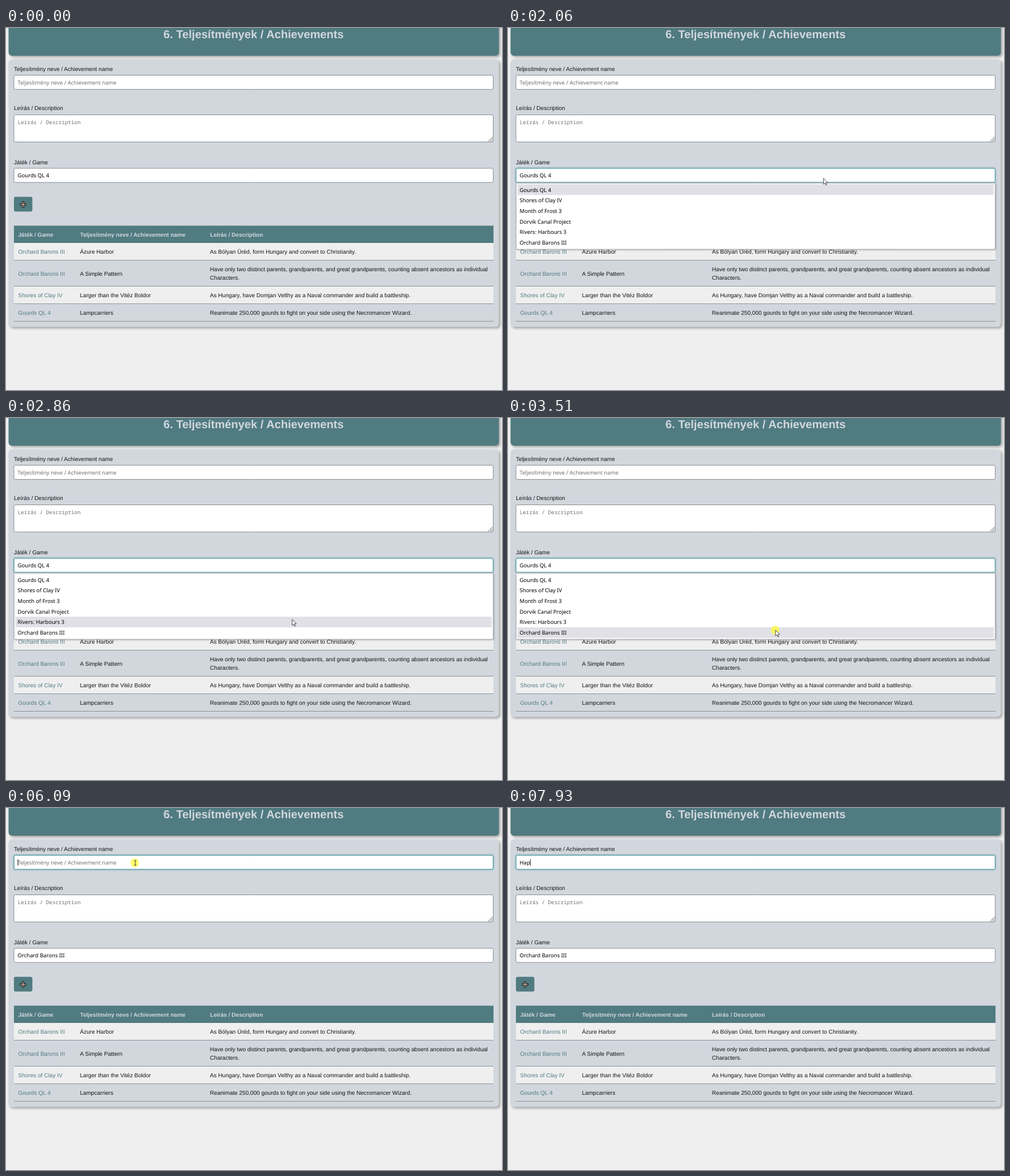
An HTML page with a canvas that plays this animation: 875x640 px, repeating every 8000 ms.

```html
<!DOCTYPE html>
<html lang="hu">
<head>
<meta charset="utf-8">
<title>Achievements</title>
<style>
  html, body { margin: 0; width: 100%; height: 100%; overflow: hidden; background: #efefef; }
  canvas { display: block; width: 875px; height: 640px; }
</style>
</head>
<body>
<canvas id="stage"></canvas>
<script>
const W = 875, H = 640, LOOP = 8000;
const TEAL = '#507b80', PANEL = '#d2d7de', LIGHT = '#efefef', INK = '#141619', PALE = '#d2d7de';
const SANS = '10.07px "Liberation Sans", Arial, sans-serif';
const BOLD = 'bold ' + SANS;
const TITLE = 'bold 20.15px "Liberation Sans", Arial, sans-serif';
const FIELD = '9.55px "Noto Sans", sans-serif';
const MONO = '9.22px "Noto Sans Mono", monospace';
const HINT = '#6f6f6f';

const NAME = 'Teljesítmény neve / Achievement name';
const GAMES = ['Gourds QL 4', 'Shores of Clay IV', 'Month of Frost 3',
  'Dorvik Canal Project', 'Rivers: Harbours 3', 'Orchard Barons III'];
const ROWS = [
  { y: 380, h: 31, game: 5, name: 'Ázure Harbor',
    text: ['As Bólyan Üréd, form Hungary and convert to Christianity.'] },
  { y: 411, h: 46, game: 5, name: 'A Simple Pattern',
    text: ['Have only two distinct parents, grandparents, and great grandparents, counting absent ancestors as individual', 'Characters.'] },
  { y: 457, h: 31, game: 1, name: 'Larger than the Vitéz Boldor',
    text: ['As Hungary, have Domjan Velthy as a Naval commander and build a battleship.'] },
  { y: 488, h: 31, game: 0, name: 'Lampcarriers',
    text: ['Reanimate 250,000 gourds to fight on your side using the Necromancer Wizard.'] }
];
const LIST_TOP = 276.5, LIST_STEP = 18.72;

// Pointer path: time, x, y, easing power (above 0 slows down, below 0 speeds up)
const PATH = [
  [480, 880, 385, 1], [1280, 605, 285, 1.5], [1440, 582.5, 277, 1], [1610, 558, 263, 1.3],
  [2040, 558, 263, 1], [2470, 530, 319.5, 1], [2860, 505, 356, 1], [3270, 472, 375, 1.3],
  [4040, 472, 375, 1], [4380, 374, 259, 1], [4820, 267, 136, 1], [5310, 228, 97, 1.4],
  [6240, 228, 97, 1], [6700, -14, 97, -1.3]
];
const CLICKS = [[1610, 1770], [3430, 3630], [6090, 6250]];

const canvas = document.getElementById('stage');
const ratio = window.devicePixelRatio || 1;
canvas.width = W * ratio;
canvas.height = H * ratio;
const c = canvas.getContext('2d');

const during = (t, a, b) => t >= a && t < b;

function text(s, x, y, font = SANS, color = INK, align = 'left') {
  c.font = font;
  c.fillStyle = color;
  c.textAlign = align;
  c.fillText(s, x, y);
}

function rect(x, y, w, h, color) {
  c.fillStyle = color;
  c.fillRect(x, y, w, h);
}

function box(x, y, w, h, r, fill, stroke) {
  c.beginPath();
  c.roundRect(x, y, w, h, r);
  c.fillStyle = fill;
  c.fill();
  if (stroke) {
    c.strokeStyle = stroke;
    c.lineWidth = 1;
    c.stroke();
  }
}

function shadow(color, blur, offset, draw) {
  c.save();
  c.shadowColor = color;
  c.shadowBlur = blur * ratio;
  c.shadowOffsetX = c.shadowOffsetY = offset * ratio;
  draw();
  c.restore();
}

function line(points, color, width) {
  c.beginPath();
  points.forEach(([x, y], i) => i ? c.lineTo(x, y) : c.moveTo(x, y));
  c.strokeStyle = color;
  c.lineWidth = width;
  c.stroke();
}

function field(y, h, focused) {
  const draw = () => box(14, y, 845.5, h, 2.5, '#fff', focused ? '#4a969d' : '#858d8f');
  if (focused) shadow('rgba(77,155,163,.7)', 3, 0, draw);
  else draw();
}

function plus(x, y) {
  for (const [r, width, color] of [[5.6, 3.8, '#1c1c1c'], [4.5, 1.6, '#c4a99c']]) {
    line([[x - r, y], [x + r, y]], color, width);
    line([[x, y - r], [x, y + r]], color, width);
  }
}

function table() {
  rect(14, 349.5, 846, 30.5, TEAL);
  text('Játék / Game', 21.5, 368.6, BOLD, PALE);
  text(NAME, 130.8, 368.6, BOLD, PALE);
  text('Leírás / Description', 360, 368.6, BOLD, PALE);
  ROWS.forEach((row, i) => {
    const mid = row.y + row.h / 2 + 3.8;
    if (i % 2 === 0) rect(14, row.y, 846, row.h, LIGHT);
    rect(14, row.y + row.h - 0.9, 846, 0.9, '#7f8b8d');
    text(GAMES[row.game], 21.5, mid, SANS, TEAL);
    text(row.name, 130.5, mid);
    row.text.forEach((s, k) => text(s, 359.8, mid + (k - (row.text.length - 1) / 2) * 15));
  });
}

function page(t) {
  rect(0, 0, W, H, LIGHT);
  shadow('rgba(0,0,0,.32)', 4, 2.5, () => box(4.5, -40, 865, 89, 6, TEAL));
  shadow('rgba(0,0,0,.32)', 4, 2.5, () => box(4.5, 55.5, 865, 473, 6, PANEL));
  text('6. Teljesítmények / Achievements', 436.8, 17.5, TITLE, PALE, 'center');

  text(NAME, 14, 75.6);
  field(83.5, 25, t >= 6090);
  nameValue(t);

  text('Leírás / Description', 14, 145);
  field(153.5, 48, false);
  text('Leírás / Description', 20.8, 169.8, MONO, HINT);
  for (const d of [8, 5, 2]) line([[858.5 - d, 200.5], [858.5, 200.5 - d]], '#555', 0.9);

  text('Játék / Game', 14, 240.6);
  field(248, 25, during(t, 1690, 6090));
  text(GAMES[t < 3630 ? 0 : 5], 20.5, 264.4, FIELD, '#000');

  box(14, 298.5, 32.5, 26, 3, TEAL);
  plus(30.2, 312);
  table();
}

function nameValue(t) {
  const typed = t < 7480 ? '' : t < 7720 ? 'H' : t < 7930 ? 'Ha' : 'Hap';
  text(typed || NAME, 20.5, 100.2, FIELD, typed ? '#000' : HINT);
  if (t >= 6090 && !during(t, 6640, 7190)) {
    const x = 20.6 + (typed ? c.measureText(typed).width : 0);
    rect(x, 90.5, 0.9, 11.5, '#000');
  }
  if (during(t, 7560, 7830)) box(14, 109.5, 845.5, 13, 1, '#fff', '#a3a8ac');
}

function list(y) {
  shadow('rgba(0,0,0,.2)', 3, 1, () => box(14, 274, 845.5, 117.3, 1.5, '#fff', '#a3a8ac'));
  const hit = Math.min(5, Math.max(0, Math.floor((y - LIST_TOP) / LIST_STEP)));
  rect(17, LIST_TOP + hit * LIST_STEP, 840, LIST_STEP, '#e0e0e6');
  GAMES.forEach((s, i) => text(s, 20.5, 289.6 + i * LIST_STEP, FIELD, '#000'));
}

function pointerAt(t) {
  const i = PATH.findIndex(k => k[0] > t);
  if (i < 1) return null;
  const [t0, x0, y0] = PATH[i - 1], [t1, x1, y1, power] = PATH[i];
  const u = (t - t0) / (t1 - t0);
  const p = power > 0 ? 1 - (1 - u) ** power : u ** -power;
  return { x: x0 + (x1 - x0) * p, y: y0 + (y1 - y0) * p };
}

function arrow() {
  c.beginPath();
  for (const [x, y] of [[0, 0], [0, 10.4], [2.4, 8.3], [4.1, 12], [5.7, 11.3], [4.1, 7.7], [7.2, 7.4]]) c.lineTo(x, y);
  c.closePath();
  c.fillStyle = '#fff';
  c.fill();
  c.strokeStyle = '#222';
  c.lineWidth = 0.8;
  c.stroke();
}

function beam() {
  line([[0, -4], [0, 4]], '#222', 0.9);
  for (const y of [-4.2, 4.2]) line([[-2.2, y], [2.2, y]], '#222', 0.8);
}

function pointer({ x, y }, t) {
  if (CLICKS.some(([a, b]) => during(t, a, b))) {
    c.beginPath();
    c.arc(x - 0.8, y - 0.2, 7.6, 0, Math.PI * 2);
    c.fillStyle = 'rgba(255,252,30,.65)';
    c.fill();
  }
  const overText = x > 14 && (during(y, 83, 109) || during(y, 153, 201));
  c.save();
  c.translate(x, y);
  if (overText) beam();
  else arrow();
  c.restore();
}

function draw() {
  const t = performance.now() % LOOP;
  c.setTransform(ratio, 0, 0, ratio, 0, 0);
  c.textRendering = 'geometricPrecision';
  page(t);
  const p = pointerAt(t);
  if (during(t, 1690, 3630)) list(p.y);
  if (p) pointer(p, t);
  requestAnimationFrame(draw);
}
draw();
</script>
</body>
</html>
```
